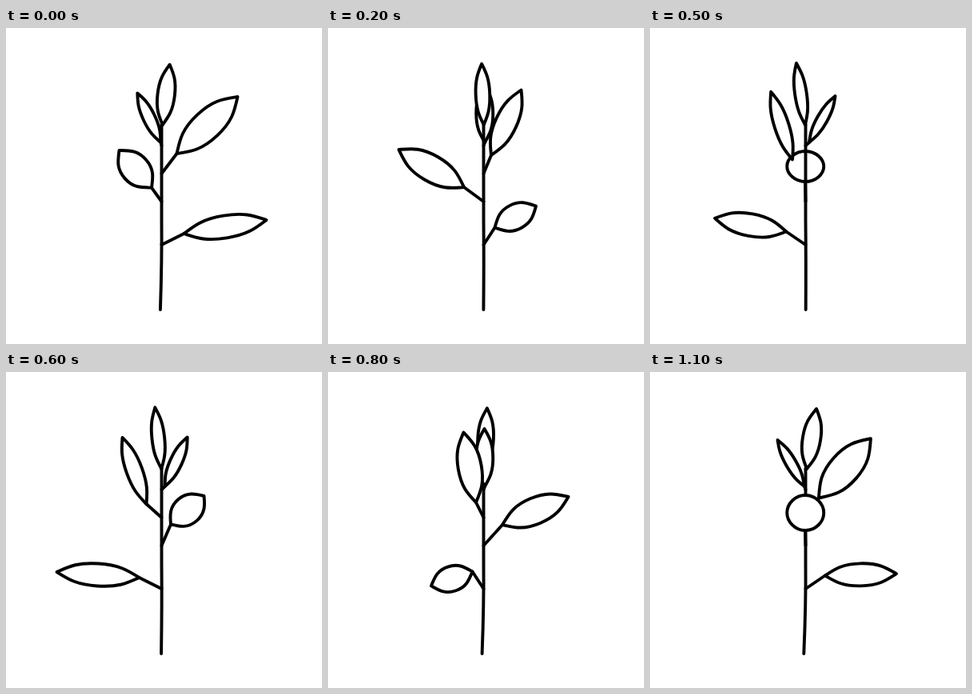
These frames come from a looping animation (395 by 395 pixels, 1.2 s). An HTML page:

```html
<!DOCTYPE html>
<html lang="en">
<head>
<meta charset="utf-8">
<title>Turning plant</title>
<style>
  html, body { margin: 0; width: 100%; height: 100%; overflow: hidden; background: #fff; }
  svg { display: block; width: 100vw; height: 100vh; }
  path { fill: #fff; stroke: #000; stroke-width: 3.9; stroke-linecap: round; stroke-linejoin: round; }
  .line { fill: none; }
</style>
</head>
<body>
<svg id="stage" viewBox="0 0 395 395"></svg>
<script>
const STEPS = 12, STEP_MS = 100, AXIS = 194.5;

// Value that swings as a leaf circles the stem: 0 is right, a quarter turn is front.
const wave = (mean, cos = 0, sin = 0, twice = 0) => angle =>
  mean + cos * Math.cos(angle) + sin * Math.sin(angle) + twice * Math.cos(2 * angle);

// Half width of a leaf that looks broad only when it points at or away from the viewer.
const broad = (side, facing) => angle =>
  side + (facing - side) * Math.sin(angle) ** 12;

// turn: steps ahead of the right-hand position; x values are relative to the stem.
const leaves = [
  { turn: 1.5, joint: 121, inFront: true, width: wave(9.3, 2),
    tipX: wave(1, 13), tipY: wave(45, 1), baseX: wave(0.5, 1), baseY: wave(121) },
  { turn: -5, joint: 147, width: wave(8.5, 0, 0, -2),
    tipX: wave(1, 36), tipY: wave(78, 0, 0, 7), baseX: wave(1.5, 3), baseY: wave(143) },
  { turn: 0, joint: 182, inFront: true, width: wave(14, 4, -3),
    tipX: wave(15, 72, 0, 8), tipY: wave(79, 2, 0, 5), baseX: wave(0, 19), baseY: wave(161, -4) },
  { turn: 4, joint: 217, width: broad(16.5, 23),
    tipX: wave(0, 106), tipY: wave(154, 2), baseX: wave(-0.5, 24), baseY: wave(195, -4, 3) },
  { turn: 0, joint: 271, width: broad(14, 23.5),
    tipX: wave(0, 131), tipY: wave(245, -5, -23), baseX: wave(0, 28), baseY: wave(252, 0, 0, 5) }
];

const add = (p, q, k = 1) => [p[0] + q[0] * k, p[1] + q[1] * k];
const fmt = (...points) => points.map(p => p.map(v => v.toFixed(2)).join(" ")).join(" ");
const line = d => `<path class="line" d="${d}"/>`;

function leafPath(base, tip, width) {
  const axis = add(tip, base, -1), length = Math.hypot(...axis);
  const across = [axis[1] * width / length, -axis[0] * width / length];
  const middle = add(base, axis, 0.5);
  // Slender leaves get pointed ends, foreshortened ones become ovals.
  const round = Math.min(1, Math.max(0, (2 * width / length - 0.6) / 0.4));
  const pull = 0.14 * (1 - round);
  const edge = (from, to, dir, side) => {
    const peak = add(middle, across, side);
    const near = add(add(from, across, side * 0.55), axis, dir * pull);
    const far = add(add(to, across, side * 0.55), axis, -dir * pull);
    return `C${fmt(near, add(peak, axis, -dir * 0.26), peak)}` +
           `C${fmt(add(peak, axis, dir * 0.26), far, to)}`;
  };
  return `M${fmt(base)}${edge(base, tip, 1, 1)}${edge(tip, base, -1, -1)}Z`;
}

function drawLeaf(leaf, step) {
  const angle = (step + leaf.turn) * 2 * Math.PI / STEPS;
  const base = [AXIS + leaf.baseX(angle), leaf.baseY(angle)];
  const tip = [AXIS + leaf.tipX(angle), leaf.tipY(angle)];
  return {
    front: leaf.inFront || Math.sin(angle) > 0.01,
    stalk: line(`M${AXIS} ${leaf.joint}L${fmt(base)}`),
    blade: `<path d="${leafPath(base, tip, leaf.width(angle))}"/>`
  };
}

function stemPath(step) {
  const foot = 193.5 + 1.5 * Math.sin(step * 2 * Math.PI / STEPS - 0.4);
  return `M${AXIS} 121V240Q${AXIS + 0.5} 290 ${foot} 352`;
}

const stage = document.getElementById("stage");

function draw(step) {
  const drawn = leaves.map(leaf => drawLeaf(leaf, step));
  const blades = front => drawn.filter(d => d.front === front).map(d => d.blade);
  stage.innerHTML = [
    ...drawn.map(d => d.stalk), ...blades(false), line(stemPath(step)), ...blades(true)
  ].join("");
}

const start = performance.now();
let shown = -1;
function tick() {
  const step = Math.floor((performance.now() - start) / STEP_MS) % STEPS;
  if (step !== shown) draw(shown = step);
  requestAnimationFrame(tick);
}
tick();
</script>
</body>
</html>
```
